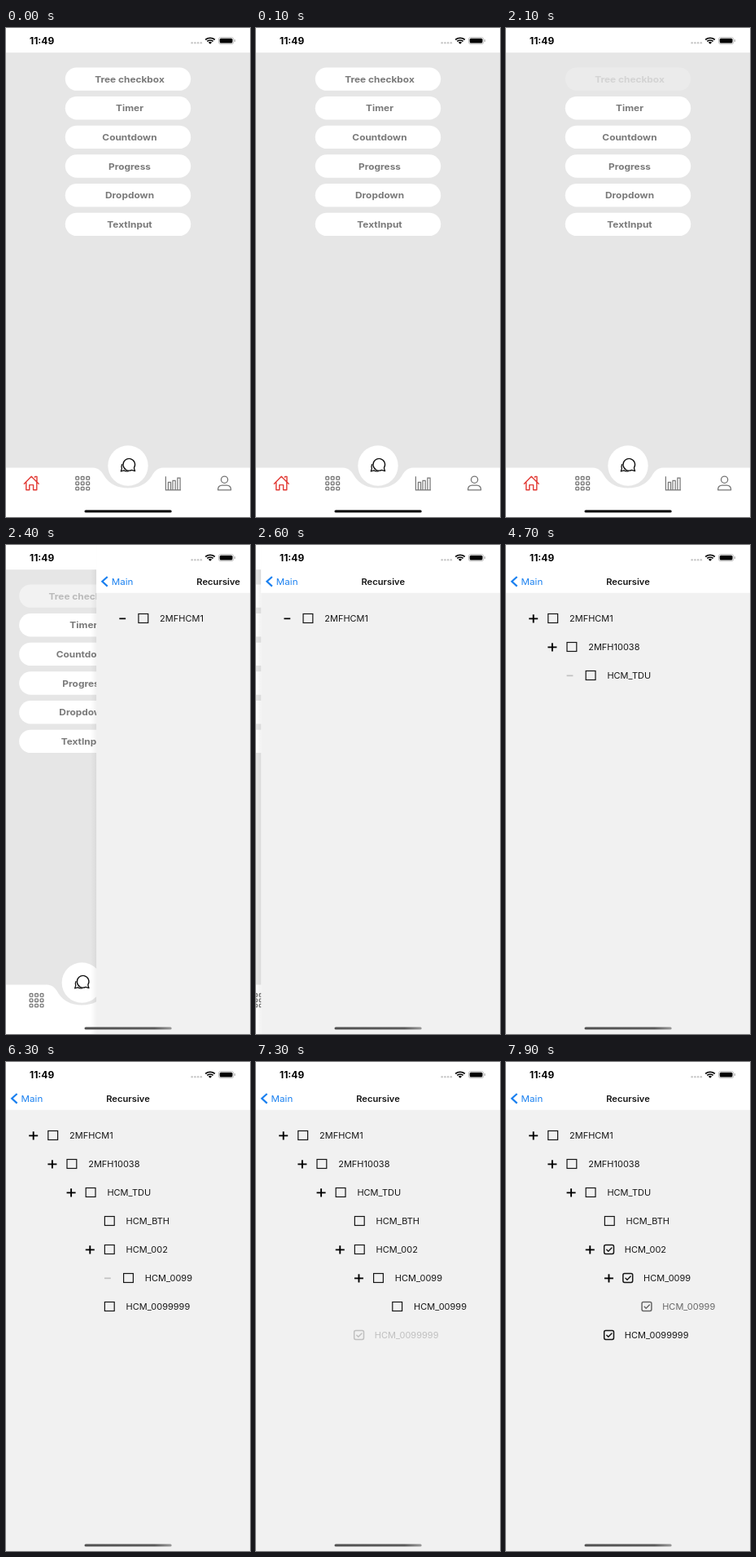
These frames come from a looping animation (300x600 px, 8 s). An HTML page with a canvas:

```html
<!DOCTYPE html>
<html lang="en">
<head>
<meta charset="utf-8">
<title>Recursive checkbox tree</title>
<style>
html, body { margin: 0; width: 100%; height: 100%; overflow: hidden; background: #fff; }
canvas { display: block; width: 300px; height: 600px; }
</style>
</head>
<body>
<canvas id="stage"></canvas>
<script>
const W = 300, H = 600, LOOP = 8000, STEP = 100;
// A 375 x 812 point phone screen shown on the 300 x 600 stage.
const SQUASH = (H / 812) / (W / 375);
const canvas = document.getElementById('stage');
const ctx = canvas.getContext('2d');
const dpr = window.devicePixelRatio || 1;
canvas.width = W * dpr;
canvas.height = H * dpr;

const FACE = 'Inter, Roboto, "Liberation Sans", sans-serif';
const GRAY = '#777', INK = '#151515', BLUE = '#1a80f0';
const BUTTONS = ['Tree checkbox', 'Timer', 'Countdown', 'Progress', 'Dropdown', 'TextInput'];

// open / tap: [finger down, finger up]
const ROWS = [
  { name: '2MFHCM1', level: 0, shown: 0, open: [3300, 3500] },
  { name: '2MFH10038', level: 1, shown: 3500, open: [4100, 4200] },
  { name: 'HCM_TDU', level: 2, shown: 4200, open: [4700, 4800] },
  { name: 'HCM_BTH', level: 3, shown: 4800 },
  { name: 'HCM_002', level: 3, shown: 4800, open: [5500, 5600], checked: 7800 },
  { name: 'HCM_0099', level: 4, shown: 5600, open: [6300, 6400], checked: 7800 },
  { name: 'HCM_00999', level: 5, shown: 6400, tap: [7700, 7800], checked: 7800 },
  { name: 'HCM_0099999', level: 3, shown: 4800, tap: [7200, 7300], checked: 7300 }
];

const clamp = v => Math.min(1, Math.max(0, v));
const easeInOut = u => u < 0.5 ? 2 * u * u : 1 - 2 * (1 - u) * (1 - u);

// Dimmed while touched, then fading back over 250 ms.
function touchAlpha(t, touch) {
  if (!touch || t < touch[0]) return 1;
  if (t < touch[1]) return 0.2;
  return 0.2 + 0.8 * easeInOut(clamp((t - touch[1] + 30) / 250));
}

// Critically damped push of the second screen.
function pushProgress(t) {
  const s = Math.max(0, t - 2283) / 1000 * Math.sqrt(1000 / 3);
  return t >= 2800 ? 1 : 1 - (1 + s) * Math.exp(-s);
}

function text(str, x, midY, size, weight, color, align = 'left') {
  ctx.save();
  ctx.translate(x, midY);
  ctx.scale(1, SQUASH);
  ctx.font = `${weight} ${size}px ${FACE}`;
  ctx.textAlign = align;
  ctx.fillStyle = color;
  ctx.fillText(str, 0, size * 0.364);
  ctx.restore();
}

function rect(x, y, w, h, color) {
  ctx.fillStyle = color;
  ctx.fillRect(x, y, w, h);
}

function pill(x, y, w, h, r, color) {
  ctx.beginPath();
  ctx.roundRect(x, y, w, h, r);
  ctx.fillStyle = color;
  ctx.fill();
}

function disc(x, y, r, color) {
  ctx.beginPath();
  ctx.arc(x, y, r, 0, Math.PI * 2);
  ctx.fillStyle = color;
  ctx.fill();
}

function line(d, color, width, join = 'round') {
  ctx.strokeStyle = color;
  ctx.lineWidth = width;
  ctx.lineJoin = join;
  ctx.lineCap = join === 'round' ? 'round' : 'butt';
  ctx.stroke(new Path2D(d));
}

function withAlpha(a, draw) {
  ctx.save();
  ctx.globalAlpha = a;
  draw();
  ctx.restore();
}

function wifi(x, y) {
  ctx.save();
  ctx.translate(x, y);
  ctx.scale(1, SQUASH);
  ctx.strokeStyle = ctx.fillStyle = '#000';
  ctx.lineCap = 'butt';
  ctx.lineWidth = 1.8;
  for (const r of [8.2, 5.2]) {
    ctx.beginPath();
    ctx.arc(0, 0, r, -Math.PI * 0.75, -Math.PI * 0.25);
    ctx.stroke();
  }
  ctx.beginPath();
  ctx.moveTo(0, 0);
  ctx.arc(0, 0, 3, -Math.PI * 0.75, -Math.PI * 0.25);
  ctx.fill();
  ctx.restore();
}

function statusBar() {
  text('11:49', 29, 15.6, 12, 700, '#000');
  for (let i = 0; i < 4; i++) disc(228.7 + i * 3.7, 18.2, 1.25, '#c8c8c8');
  wifi(251, 19.8);
  ctx.beginPath();
  ctx.roundRect(261.4, 11.5, 18.4, 8.2, 2.5);
  ctx.strokeStyle = '#a8a8a8';
  ctx.lineWidth = 0.7;
  ctx.stroke();
  pill(262.7, 12.7, 15.8, 5.8, 1.5, '#000');
  pill(280.7, 14.1, 1.1, 3, 0.5, '#a8a8a8');
}

function homeIndicator(pushed) {
  let color = '#000';
  if (pushed) {
    color = ctx.createLinearGradient(97, 0, 204, 0);
    color.addColorStop(0, '#505050');
    color.addColorStop(0.8, '#5a5a5a');
    color.addColorStop(1, '#9a9a9a');
  }
  pill(96.5, 591.5, 107.2, 3, 1.5, color);
}

function tabBar() {
  ctx.fillStyle = '#fff';
  ctx.fill(new Path2D('M0 539.5H106C115 539.5 118 545 121 550C127 559.5 137 564.5 150 564.5' +
    'C163 564.5 173 559.5 179 550C182 545 185 539.5 194 539.5H300V600H0Z'));
  disc(150, 537, 24.7, '#fff');

  // chat
  line('M158.6 543.6L154.6 542.3A7.3 7.3 0 1 1 157.4 539.8Z', '#111', 1.3);
  line('M142.6 535.6A6.8 6.8 0 0 0 142.4 540.6L141.3 544L144.9 542.9A7 7 0 0 0 150.6 543.6', '#111', 1.3);

  // house
  line('M22.4 559.3L31.2 550.2L40.2 559.3M35.6 551.2V550.4H38V556.6' +
    'M24.8 557.4V566.8H28.8V560.6H33.6V566.8H37.8V557.4', '#e23a35', 1.4);

  // grid
  ctx.strokeStyle = GRAY;
  ctx.lineWidth = 1.3;
  for (let i = 0; i < 9; i++) {
    ctx.beginPath();
    ctx.roundRect(85.8 + (i % 3) * 6.5, 550.5 + Math.floor(i / 3) * 6.4, 3.8, 3.6, 0.9);
    ctx.stroke();
  }

  // chart
  line('M196.4 550.2V566.8H215M199.4 566.5V557.4H202.6V566.5' +
    'M205 566.5V555.4H208.2V566.5M210.9 566.5V552.2H214.1V566.5', GRAY, 1.2, 'miter');

  // person
  line('M272.7 554.2A4.1 4.1 0 1 1 264.5 554.2A4.1 4.1 0 1 1 272.7 554.2Z' +
    'M260.6 566.8C260.6 562.8 263.2 561.2 266 561.2H271.2C274 561.2 276.6 562.8 276.6 566.8Z', GRAY, 1.3);
}

function mainScreen(t) {
  rect(0, 0, W, H, '#e6e6e6');
  rect(0, 0, W, 30.2, '#fff');
  BUTTONS.forEach((label, i) => {
    const y = 48.4 + i * 35.65;
    withAlpha(i ? 1 : touchAlpha(t, [2100, 2330]), () => {
      pill(72.8, y, 154.4, 28.4, 14.2, '#fff');
      text(label, 152, y + 14.2, 11.9, 700, '#7a7a7a', 'center');
    });
  });
  tabBar();
}

function checkbox(x, y, checked) {
  if (checked) {
    ctx.beginPath();
    ctx.roundRect(x - 6.6, y - 5.4, 11.8, 10.8, 1.8);
    ctx.strokeStyle = INK;
    ctx.lineWidth = 1.5;
    ctx.stroke();
    line(`M${x - 3.5} ${y + 0.2}l2 2.1l4.2 -4.4`, INK, 1.4);
  } else {
    ctx.strokeStyle = INK;
    ctx.lineWidth = 1.2;
    ctx.lineJoin = 'miter';
    ctx.strokeRect(x - 5.9, y - 5.5, 11.8, 11);
  }
}

function treeRow(row, y, t) {
  const dx = row.level * 23.2;
  const checked = t >= row.checked;
  if (row.open) {
    withAlpha(touchAlpha(t, row.open), () => {
      if (t >= row.open[1]) {
        rect(28.2 + dx, y - 0.5, 11, 1.8, '#000');
        rect(32.75 + dx, y - 4.7, 1.9, 10.2, '#000');
      } else {
        rect(28.2 + dx, y - 0.5, 7.8, 1.7, '#000');
      }
    });
  }
  withAlpha(touchAlpha(t, row.tap), () => {
    checkbox(57.7 + dx, y, checked);
    text(row.name, (checked ? 76.2 : 78) + dx, y + 0.6, 11, 400, INK);
  });
}

function treeScreen(t) {
  rect(0, 0, W, H, '#f1f1f1');
  rect(0, 0, W, 58.8, '#fff');
  line('M13.6 39L7.2 44.8L13.6 50.6', BLUE, 2.2, 'miter');
  text('Main', 18.6, 44.9, 11.6, 400, BLUE);
  text('Recursive', 150, 44.8, 11.2, 600, '#151515', 'center');
  ROWS.filter(row => t >= row.shown).forEach((row, i) => treeRow(row, 90 + i * 35, t));
}

function pageShadow(x) {
  const g = ctx.createLinearGradient(x - 7, 0, x, 0);
  g.addColorStop(0, 'rgba(0,0,0,0)');
  g.addColorStop(1, 'rgba(0,0,0,0.05)');
  rect(x - 7, 30, 7, H - 30, g);
}

function shifted(x, draw) {
  ctx.save();
  ctx.translate(x, 0);
  draw();
  ctx.restore();
}

function render(t) {
  ctx.setTransform(dpr, 0, 0, dpr, 0, 0);
  ctx.clearRect(0, 0, W, H);
  const p = pushProgress(t);
  if (p < 1) {
    rect(0, 0, W, H, '#e6e6e6');
    shifted(-90 * p, () => mainScreen(t));
  }
  if (p > 0) {
    const x = W * (1 - p);
    if (p < 1) pageShadow(x);
    shifted(x, () => treeScreen(t));
  }
  statusBar();
  homeIndicator(p > 0.3);
}

const start = performance.now();
function tick() {
  const t = (performance.now() - start) % LOOP;
  render(Math.floor(t / STEP) * STEP);
  requestAnimationFrame(tick);
}
tick();
</script>
</body>
</html>
```
